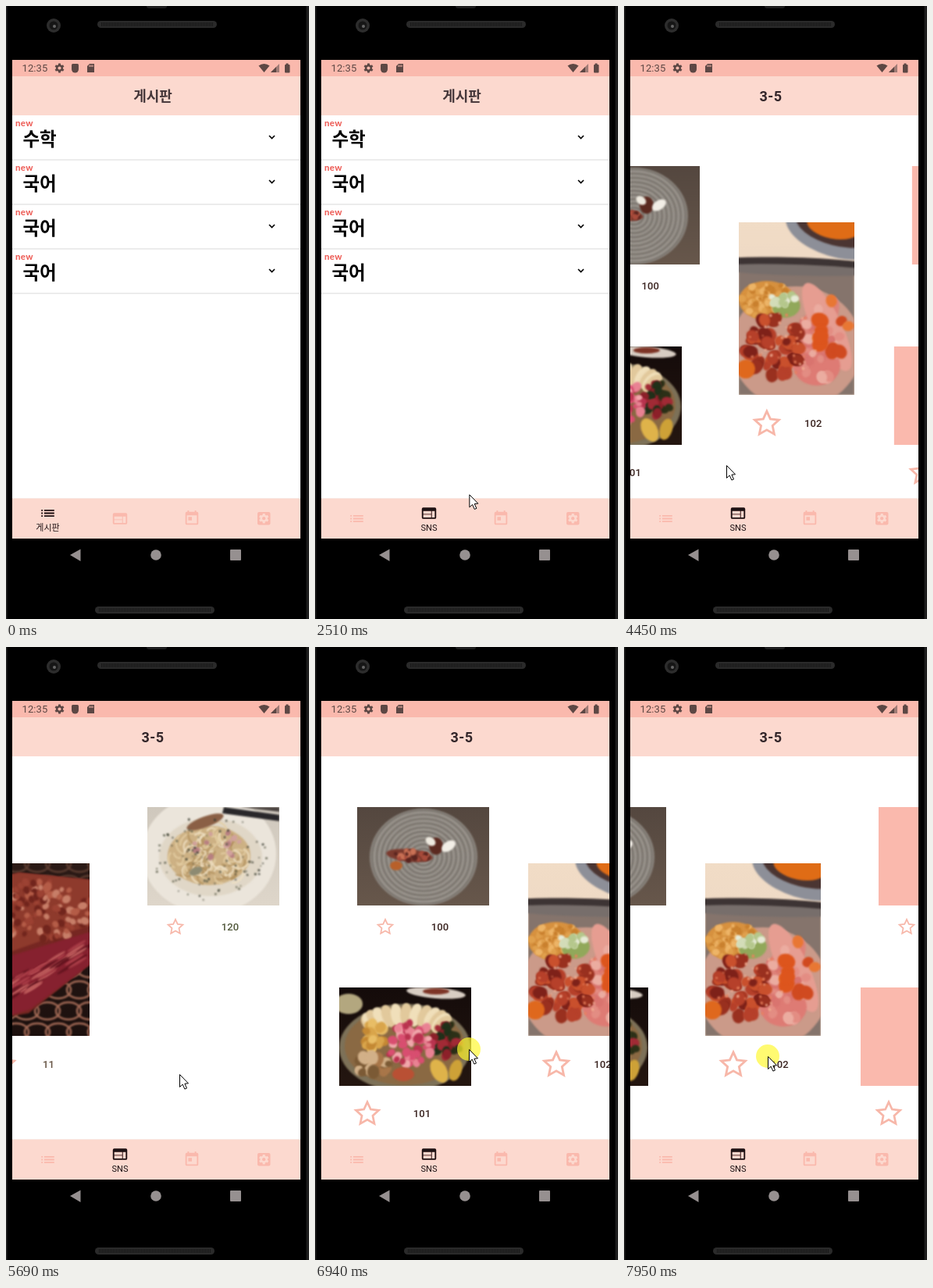
An HTML page with a canvas for the animation above (8000 ms loop, 388 by 785 pixels).

```html
<!DOCTYPE html>
<html lang="ko">
<head>
<meta charset="utf-8">
<style>
html, body { margin: 0; width: 100%; height: 100%; overflow: hidden; background: #000; }
canvas { display: block; }
</style>
</head>
<body>
<canvas id="stage" width="388" height="785"></canvas>
<script>
const ctx = document.getElementById('stage').getContext('2d');
const LOOP = 8000, PERIOD = 441, TAU = Math.PI * 2;
const PINK = '#fab9ad', PALE = '#fcd9cf', INK = '#33262a', STATUS = '#5c4744';
const LATIN = 'Roboto, sans-serif';
const HANGUL = '"Noto Sans CJK KR", "Noto Sans CJK", sans-serif';

const ENTER = 270, TAP = 1960, OPEN_FEED = 2740, LAST_PRESS = 7950, PRESS_TIME = 170;

// Each glide eases from wherever the previous one ended.
const glide = (start, end, ...to) => ({ start, end, to });
const POINTER = [
  glide(0, 0, 220, 715), glide(ENTER, 500, 167, 648), glide(900, 1350, 129, 649),
  glide(1500, TAP, 131, 653), glide(2130, 2590, 203, 623), glide(3350, 3430, 206, 563),
  glide(3430, 4200, 264, 577), glide(4200, 4450, 131, 588), glide(4450, 5210, 174, 556),
  glide(5290, 5690, 222, 547), glide(5690, 5840, 135, 570), glide(5840, 6150, 270, 605),
  glide(6150, 6480, 119, 529), glide(6550, 6900, 197, 515), glide(6940, 7490, 48, 522),
  glide(7640, LAST_PRESS, 184, 524)
];
const SCROLL = [glide(0, 0, 0), glide(4185, 5210, 755), glide(5840, 6480, 0), glide(6940, 7490, 169)];
const PRESSES = [TAP, LAST_PRESS, ...SCROLL.slice(1).map(g => g.start)];

const clamp = v => Math.max(0, Math.min(1, v));
const smooth = u => u * u * (3 - 2 * u);

function follow(glides, t) {
  return glides.slice(1).reduce((at, g) => {
    const u = smooth(clamp((t - g.start) / (g.end - g.start)));
    return at.map((v, i) => v + (g.to[i] - v) * u);
  }, glides[0].to);
}

function random(seed) {
  return () => (seed = (seed * 16807) % 2147483647) / 2147483647;
}

function rect(c, x, y, w, h, color, radius = 0) {
  c.fillStyle = color;
  c.beginPath();
  c.roundRect(x, y, w, h, radius);
  c.fill();
}

function blob(c, x, y, rx, ry, color, turn = 0) {
  c.fillStyle = color;
  c.beginPath();
  c.ellipse(x, y, rx, ry, turn, 0, TAU);
  c.fill();
}

function poly(c, points, color) {
  c.fillStyle = color;
  c.beginPath();
  points.forEach(p => c.lineTo(...p));
  c.closePath();
  c.fill();
}

function ring(c, x, y, rx, ry, color, width) {
  c.strokeStyle = color;
  c.lineWidth = width;
  c.beginPath();
  c.ellipse(x, y, rx, ry, 0, 0, TAU);
  c.stroke();
}

function scatter(c, seed, count, x, y, rx, ry, size, colors) {
  const rnd = random(seed * 7919);
  for (let i = 0; i < count; i++) {
    const a = rnd() * TAU, d = Math.sqrt(rnd()), s = size * (0.6 + rnd() * 0.6);
    blob(c, x + Math.cos(a) * d * rx, y + Math.sin(a) * d * ry, s, s * 0.85, colors[i % colors.length], a);
  }
}

function text(str, x, y, font, color, align = 'center', spacing = 0) {
  ctx.font = font;
  ctx.fillStyle = color;
  ctx.textAlign = align;
  ctx.letterSpacing = spacing + 'px';
  ctx.fillText(str, x, y);
  ctx.letterSpacing = '0px';
}

function photo(w, h, [from, to], paint) {
  const canvas = document.createElement('canvas');
  canvas.width = w;
  canvas.height = h;
  const c = canvas.getContext('2d');
  const shade = c.createLinearGradient(0, 0, 0, h);
  shade.addColorStop(0, from);
  shade.addColorStop(1, to);
  rect(c, 0, 0, w, h, shade);
  c.filter = 'blur(0.8px)';
  paint(c);
  return canvas;
}

const dessert = photo(169, 126, ['#54473f', '#67574b'], c => {
  blob(c, 85, 64, 69, 62, '#8a847d');
  for (let r = 6; r < 68; r += 3) ring(c, 85, 64, r, r * 0.91, r % 2 ? '#a5a099' : '#78726b', 1.3);
  blob(c, 67, 62, 30, 8, '#7b3a2e', 0.1);
  scatter(c, 5, 20, 66, 62, 27, 6, 4, ['#a84c3c', '#59241f', '#c97155']);
  blob(c, 50, 75, 8, 6, '#b8602a');
  blob(c, 101, 50, 9, 11, '#5b2a20');
  blob(c, 94, 44, 7, 5, '#eee9df', 0.6);
  blob(c, 117, 50, 10, 6, '#f2eee6', -0.6);
});

const platter = photo(169, 126, ['#140b0a', '#241610'], c => {
  blob(c, 12, 21, 18, 13, '#b3a77f');
  blob(c, 124, 7, 38, 7, '#d8cdc3', 0.08);
  blob(c, 124, 5, 17, 4, '#7d3426');
  blob(c, 84, 77, 84, 56, '#7d7158');
  blob(c, 84, 75, 77, 50, '#8a6943');
  for (let i = 0; i < 13; i++) {
    const a = i / 12 * Math.PI;
    blob(c, 86 - Math.cos(a) * 46, 48 - Math.sin(a) * 13, 8, 15, i % 2 ? '#f0dfba' : '#e2c99c', -Math.cos(a) * 0.8);
  }
  scatter(c, 21, 24, 46, 63, 14, 20, 7, ['#d9a54b', '#c48934', '#e8bd66']);
  scatter(c, 14, 30, 138, 67, 18, 22, 7, ['#2c3017', '#8c2029', '#a12a35', '#203019']);
  scatter(c, 33, 55, 91, 72, 33, 27, 6, ['#d84e70', '#e98293', '#b9334f', '#f0a8ab']);
  scatter(c, 8, 18, 45, 99, 24, 13, 8, ['#a87649', '#d2b088', '#7b5a35']);
  blob(c, 82, 111, 14, 9, '#b95034');
  blob(c, 128, 107, 10, 16, '#dfb34a', -0.5);
  blob(c, 149, 106, 8, 14, '#cda137', 0.3);
});

const seafood = photo(148, 221, ['#f1dcc6', '#e8d3c2'], c => {
  blob(c, 124, 10, 66, 34, '#8d8f98', 0.3);
  blob(c, 126, 5, 54, 25, '#4b3532', 0.25);
  blob(c, 121, 5, 34, 16, '#df6c16', 0.2);
  rect(c, 0, 52, 148, 169, '#85746c');
  blob(c, 72, 54, 112, 9, '#3d3434', 0.03);
  blob(c, 72, 61, 108, 7, '#776e6b', 0.03);
  blob(c, 74, 160, 84, 78, '#cb9a89');
  blob(c, 36, 100, 36, 25, '#d7913f');
  scatter(c, 41, 75, 36, 99, 33, 23, 4, ['#e0a04d', '#c9802e', '#edb467']);
  blob(c, 94, 141, 20, 54, '#de837a', 0.6);
  blob(c, 113, 134, 19, 62, '#e69d91', -0.45);
  blob(c, 100, 184, 30, 25, '#de7b74');
  scatter(c, 12, 28, 103, 154, 28, 48, 7, ['#ebaca0', '#d9746f', '#e38d83']);
  blob(c, 61, 108, 18, 14, '#91a85a', -0.2);
  scatter(c, 19, 20, 56, 98, 18, 8, 5, ['#d3dcb8', '#b5c78c', '#e6ead6']);
  scatter(c, 77, 62, 45, 161, 38, 42, 9, ['#99301f', '#b6402a', '#7e2119', '#c9502d']);
  scatter(c, 9, 10, 121, 138, 20, 38, 11, ['#dd551d', '#e87734', '#d04a20']);
  scatter(c, 23, 35, 58, 155, 48, 40, 1.8, ['#e9825e', '#f0ab91']);
  blob(c, 9, 188, 12, 12, '#df681d');
});

const steak = photo(148, 221, ['#2b1a16', '#1c100e'], c => {
  for (let row = 0; row < 9; row++)
    for (let col = 0; col < 7; col++)
      ring(c, col * 27 + (row % 2) * 13, row * 27, 16, 11, row < 5 ? '#5c3c30' : '#a36a56', 2.5);
  poly(c, [[0, 25], [58, 12], [148, 21], [148, 130], [70, 192], [0, 204]], '#762722');
  poly(c, [[0, 25], [58, 12], [148, 21], [148, 80], [84, 100], [0, 130]], '#8e3a2c');
  scatter(c, 61, 140, 82, 60, 74, 38, 5, ['#b45c47', '#71251d', '#9c4233', '#c77e68']);
  poly(c, [[35, 122], [148, 88], [148, 130], [72, 187], [20, 203]], '#86212f');
  const rnd = random(4001);
  for (let i = 0; i < 45; i++) {
    const x = 40 + rnd() * 108;
    blob(c, x, 185 - x * 0.5 + rnd() * 28 - 14, 14, 1.8, ['#a93d47', '#64141f', '#bd5b5b'][i % 3], -0.55);
  }
});

const pasta = photo(169, 126, ['#cfc8bd', '#ded6ca'], c => {
  blob(c, 79, 60, 86, 76, '#ebe5db');
  blob(c, 81, 64, 66, 50, '#e0d7c7');
  poly(c, [[98, 0], [169, 10], [169, 18], [96, 8]], '#29272a');
  poly(c, [[118, 0], [169, 0], [169, 6]], '#4a4340');
  blob(c, 79, 62, 53, 38, '#cdb184');
  const rnd = random(88001);
  for (let i = 0; i < 90; i++) {
    const a = rnd() * TAU, d = Math.sqrt(rnd()), bend = rnd() * TAU;
    c.strokeStyle = ['#e3cda2', '#b3925f', '#efe0c3'][i % 3];
    c.lineWidth = 2;
    c.beginPath();
    c.arc(79 + Math.cos(a) * d * 44, 62 + Math.sin(a) * d * 30, 5 + rnd() * 10, bend, bend + 2);
    c.stroke();
  }
  blob(c, 74, 19, 25, 7, '#8a5f45', -0.35);
  scatter(c, 18, 15, 90, 50, 30, 22, 4, ['#b77f81', '#d1a29d']);
  blob(c, 62, 82, 9, 5, '#8d8a72', -0.4);
  scatter(c, 29, 90, 82, 65, 74, 56, 1.4, ['#3a3d31', '#5a5c49']);
});

const SLOTS = {
  top: { x: 54, y: 205, w: 169, h: 126, starY: 358, starR: 11, labelX: 106 },
  bottom: { x: 31, y: 436, w: 169, h: 126, starY: 597, starR: 17, labelX: 106 },
  tall: { x: 273, y: 277, w: 148, h: 221, starY: 534, starR: 18, labelX: 95.5 }
};
const CARDS = [
  { slot: 'top', group: 0, likes: 100, image: dessert, loadAt: 3660 },
  { slot: 'bottom', group: 0, likes: 101, image: platter, loadAt: 3430 },
  { slot: 'tall', group: 0, likes: 102, image: seafood, loadAt: 3430 },
  { slot: 'top', group: 1, likes: 103 },
  { slot: 'bottom', group: 1, likes: 104 },
  { slot: 'tall', group: 1, likes: 11, image: steak, loadAt: 5000, color: '#665443' },
  { slot: 'top', group: 2, likes: 120, image: pasta, loadAt: 5000, color: '#52593c' }
];

// Icons sit on a 24-unit grid; overlapping boxes cut holes.
function boxes(...list) {
  const path = new Path2D();
  list.forEach(([x, y, w, h, r = 0]) => path.roundRect(x, y, w, h, r));
  return path;
}
const ICONS = {
  list: boxes(...[7, 11, 15].flatMap(y => [[3, y, 2, 2], [7, y, 14, 2]])),
  web: boxes([2, 4, 20, 16, 2], [4, 9, 11, 4], [4, 14, 11, 4], [16, 9, 4, 9]),
  day: boxes([3, 3, 18, 18, 2], [5, 8, 14, 11], [7, 10, 5, 5], [6, 1, 2, 2], [16, 1, 2, 2])
};

function icon(name, x, y, color) {
  ctx.save();
  ctx.translate(x, y);
  ctx.scale(0.92, 0.92);
  ctx.translate(-12, -12);
  ctx.fillStyle = color;
  ctx.fill(ICONS[name], 'evenodd');
  ctx.restore();
}

function gear(x, y, r, color, hole) {
  blob(ctx, x, y, r * 0.76, r * 0.76, color);
  for (let i = 0; i < 6; i++) {
    ctx.save();
    ctx.translate(x, y);
    ctx.rotate(i * TAU / 6);
    rect(ctx, -r * 0.24, -r, r * 0.48, r * 0.6, color);
    ctx.restore();
  }
  blob(ctx, x, y, r * 0.34, r * 0.34, hole);
}

function star(x, y, r) {
  ctx.beginPath();
  for (let i = 0; i < 10; i++) {
    const a = i * TAU / 10 - TAU / 4, d = (i % 2 ? 0.43 : 0.9) * r;
    ctx.lineTo(x + Math.cos(a) * d, y + r * 0.06 + Math.sin(a) * d);
  }
  ctx.closePath();
  ctx.strokeStyle = '#f7b7a9';
  ctx.lineWidth = r * 0.16;
  ctx.stroke();
}

function drawPhone() {
  rect(ctx, 0, 0, 388, 785, '#000');
  rect(ctx, 0, 0, 1.5, 785, '#242424');
  rect(ctx, 384.5, 0, 3.5, 785, '#1e1e1e');
  rect(ctx, 180, -4, 26, 7, '#1d1d1d', 3);
  blob(ctx, 61, 25, 9, 9, '#2d2d2d');
  blob(ctx, 61, 25, 5.5, 5.5, '#161616');
  blob(ctx, 62, 26, 2, 2, '#666');
  for (const [x, y] of [[117, 19], [114, 769]]) {
    rect(ctx, x, y, 153, 9, '#2a2a2a', 4.5);
    for (let i = 5; i < 148; i += 2) rect(ctx, x + i, y + 2, 1, 5, '#171717');
  }
  const grey = '#969090';
  poly(ctx, [[82, 703], [95.5, 695.5], [95.5, 711]], grey);
  blob(ctx, 192, 703, 6.8, 6.8, grey);
  rect(ctx, 287, 696, 14, 14, grey, 1);
}

function drawStatus() {
  rect(ctx, 8, 69, 369, 21, PINK);
  text('12:35', 20.5, 84, '13px ' + LATIN, STATUS, 'left', 0.1);
  gear(68.5, 79.5, 6, STATUS, PINK);
  rect(ctx, 84, 74, 9, 11.5, STATUS, [2, 2, 6, 6]);
  poly(ctx, [[107, 74], [113, 74], [113, 85], [104, 85], [104, 77]], STATUS);
  for (let i = 0; i < 3; i++) rect(ctx, 106.5 + i * 2, 75.5, 1, 2.5, PINK);
  ctx.fillStyle = STATUS;
  ctx.beginPath();
  ctx.moveTo(330.5, 85);
  ctx.arc(330.5, 85, 11, -TAU * 0.36, -TAU * 0.14);
  ctx.fill();
  poly(ctx, [[339, 85], [350, 85], [350, 74]], '#a07c76');
  poly(ctx, [[339, 85], [346, 85], [346, 78]], STATUS);
  rect(ctx, 358.5, 73.5, 3, 2, STATUS);
  rect(ctx, 357, 75, 6.5, 10.5, STATUS, 1);
}

function drawBoard() {
  ['수학', '국어', '국어', '국어'].forEach((subject, i) => {
    const y = 140 + i * 57;
    text('new', 12, y + 13.5, '800 11.5px Lato, sans-serif', '#ee625c', 'left', 0.3);
    text(subject, 21.5, y + 38.5, '900 23.5px ' + HANGUL, '#000', 'left');
    ctx.strokeStyle = '#000';
    ctx.lineWidth = 1.6;
    ctx.beginPath();
    ctx.moveTo(337, y + 26);
    ctx.lineTo(340.5, y + 29.5);
    ctx.lineTo(344, y + 26);
    ctx.stroke();
    rect(ctx, 8, y + 56, 369, 2, '#ececec');
  });
}

function drawFeed(t) {
  const [scroll] = follow(SCROLL, t);
  for (const card of CARDS) {
    const s = SLOTS[card.slot], x = s.x + card.group * PERIOD - scroll;
    if (x > 377 || x + s.w < 8) continue;
    if (card.image && t >= card.loadAt) ctx.drawImage(card.image, x, s.y);
    else rect(ctx, x, s.y, s.w, s.h, PINK);
    star(x + 36, s.starY, s.starR);
    text(card.likes, x + s.labelX, s.starY + 5, '500 13px ' + LATIN, card.color || '#3a2420', 'center', 0.1);
  }
}

function drawTab(name, label, x, active, font) {
  const y = 656.5 - 7 * active;
  icon(name, x, y, PINK);
  ctx.globalAlpha = active;
  icon(name, x, y, '#1d1214');
  text(label, x, 672, font, '#1d1214', 'center', 0.1);
  ctx.globalAlpha = 1;
}

function drawTabs(t) {
  const change = smooth(clamp((t - 2130) / 320));
  rect(ctx, 8, 630, 369, 52, '#f9e9e4');
  rect(ctx, 8, 631, 369, 51, PALE);
  drawTab('list', '게시판', 53.5, 1 - change, '11px ' + HANGUL);
  drawTab('web', 'SNS', 146, change, '11px ' + LATIN);
  icon('day', 238, 656, PINK);
  rect(ctx, 322, 648, 16.5, 16.5, PINK, 2);
  gear(330.2, 656.2, 6.2, PALE, PINK);
}

function drawPointer(t) {
  if (t < ENTER) return;
  const [x, y] = follow(POINTER, t);
  if (PRESSES.some(start => t >= start && t < start + PRESS_TIME)) blob(ctx, x, y, 15, 15, 'rgba(255,248,45,.68)');
  ctx.save();
  ctx.translate(x + 0.5, y + 0.5);
  poly(ctx, [[0, 0], [0, 16], [3.7, 12.6], [6.4, 18.6], [9, 17.5], [6.4, 11.7], [11, 11.3]], '#fff');
  ctx.strokeStyle = '#000';
  ctx.lineWidth = 1;
  ctx.stroke();
  ctx.restore();
}

function draw(t) {
  const feed = t >= OPEN_FEED;
  drawPhone();
  ctx.save();
  ctx.beginPath();
  ctx.rect(8, 69, 369, 613);
  ctx.clip();
  rect(ctx, 8, 69, 369, 613, '#fff');
  if (feed) drawFeed(t); else drawBoard();
  drawStatus();
  rect(ctx, 8, 90, 369, 50, PALE);
  if (feed) text('3-5', 188, 122, 'bold 18px ' + LATIN, INK, 'center', 0.5);
  else text('게시판', 188, 122, 'bold 18px ' + HANGUL, '#46373a');
  drawTabs(t);
  ctx.restore();
  drawPointer(t);
}

const began = performance.now();
function tick() {
  draw((performance.now() - began) % LOOP);
  requestAnimationFrame(tick);
}
tick();
</script>
</body>
</html>
```
